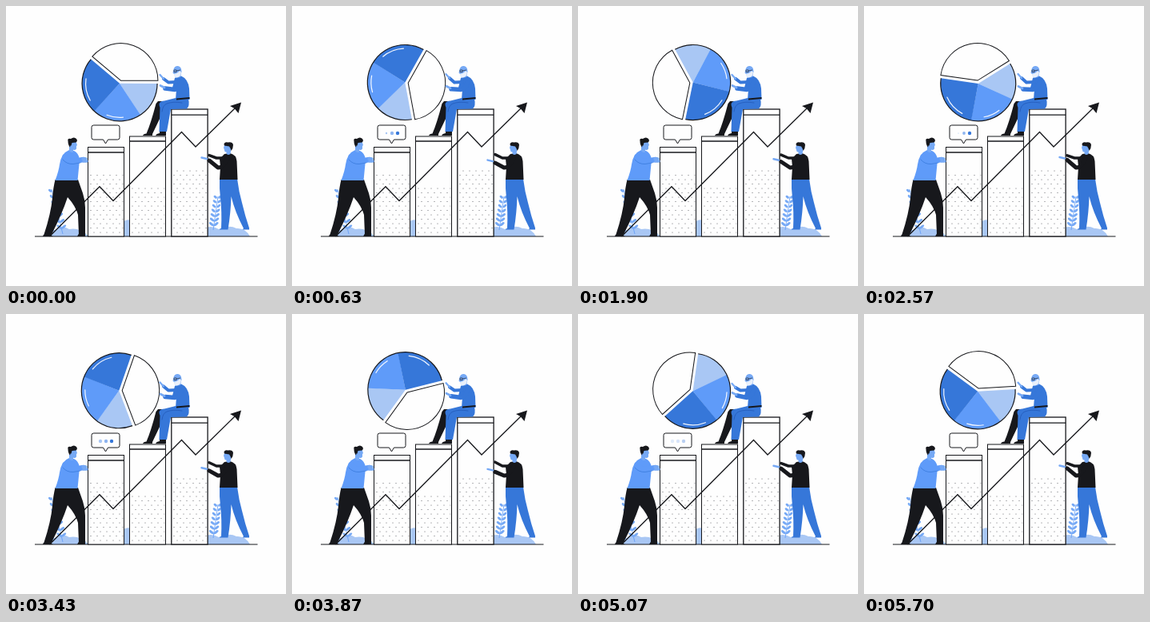
Write an HTML page that moves like this. It is 350x350 px and loops after 5730 ms.

```html
<!DOCTYPE html>
<html lang="en">
<head>
<meta charset="utf-8">
<title>Growth chart</title>
<style>
  html, body { margin: 0; width: 100%; height: 100%; overflow: hidden; background: #fefefe; }
  svg { display: block; width: 100vw; height: 100vh; }
  .ink { fill: #17181c; }
  .deep { fill: #3677d9; }
  .mid { fill: #5f9bf9; }
  .skin { fill: #76a9f5; }
  .pale { fill: #a9c7f4; }
  .line { fill: none; stroke: #17181c; stroke-width: 1; stroke-linejoin: miter; }
  .paper { fill: #fefefe; stroke: #17181c; stroke-width: 1; }
  .limb { fill: none; stroke-linecap: round; stroke-linejoin: round; }
</style>
</head>
<body>
<svg viewBox="0 0 350 350">
  <defs>
    <pattern id="specks" width="8" height="11" patternUnits="userSpaceOnUse">
      <circle cx="2" cy="2.5" r=".55" fill="#55575e"/>
      <circle cx="6" cy="8" r=".55" fill="#55575e"/>
    </pattern>
  </defs>

  <!-- ground and plants -->
  <g class="pale">
    <path d="M46 288Q51 278 61 280Q70 273 79 279Q91 276 104 288Z"/>
    <path d="M146 288V270Q151 266 156 268V288Z"/>
    <path d="M250 288V277Q258 274 266 279Q279 273 288 278Q299 277 305 288Z"/>
  </g>
  <g id="plants"></g>
  <path class="line" d="M36 288H314.500"/>

  <g id="bars"></g>

  <!-- speech bubble -->
  <path class="paper" d="M109.500 149H139.500Q142 149 142 151.500V164.500Q142 167 139.500 167H127.500L124.500 172L121.500 167H109.500Q107 167 107 164.500V151.500Q107 149 109.500 149Z"/>
  <g id="typing"></g>

  <!-- man on the left -->
  <g>
    <path class="ink" d="M61.500 217H90L96 234Q99 243 99 252V285.500H91L90 261Q87 250 77 239Q70 260 57 285.500H47.500Q56 260 58 240Q59 227 61.500 217Z"/>
    <path class="ink" d="M46 288Q47 284.500 50 284.500H57Q56 287 59 288ZM89 288L91 284.500H99V288Z"/>
    <path class="mid" d="M79 180L85 181Q91 184 92 192L89.500 218H61.500Q66 206 67 198Q69 184 79 180Z"/>
    <path class="limb" stroke="#5f9bf9" stroke-width="6.500" d="M74 188Q77 194 84 194L97 192"/>
    <path class="limb" stroke="#3677d9" stroke-width=".7" d="M71 192Q76 198 84 197.500L93 196"/>
    <path class="limb" stroke="#76a9f5" stroke-width="3.500" d="M96 191L100 191M97 194L101 194"/>
    <path class="skin" d="M79 170L87.500 169.500L89 174L88 175V178.500Q86 181 84 179.500V182.500Q81 184 79 181Z"/>
    <path class="ink" d="M77.500 169Q76.500 165 81 166Q85 163 88 166Q90 168.500 87.500 170.500L82.500 171L81.500 174.500H80.500L80 176.500Q77.500 174 77.500 169Z"/>
  </g>

  <!-- seated man -->
  <g>
    <path class="ink" d="M187.500 122L190 119L196 119L193.500 138L183 160V162H171Q172 159.500 175.500 159.500Q181 147 187.500 122ZM192 156H200V162H187Q188 159.500 192 159Z"/>
    <path class="deep" d="M228 116Q230 125 226 128.500L206 129L201 157H191.500L192.500 127Q189 119 198 118.500L212 115Z"/>
    <path class="limb" stroke="#2157b5" stroke-width=".7" d="M220 121Q209 119 201 122Q196 124 195 132"/>
    <path class="deep" d="M211 90L219 87.500Q227.500 91 229 103L229.500 117H212L213 104L208 102Z"/>
    <path class="ink" d="M213 115.500L229.500 114V116L213 117.500Z"/>
    <path class="skin" d="M209.500 79Q211 74.500 215 75Q219.500 76 219.500 82L218 89L212 90L210 85L208.500 83.500Z"/>
    <path fill="#e9f0fb" d="M210 85L213.500 84L217.500 81L219 83Q218.500 89 213 89.500Q210 89 210 85Z"/>
    <path class="line" style="stroke-width:.6" d="M210 80H213V82.500H210ZM213 81L218 80"/>
  </g>

  <!-- man on the right -->
  <g>
    <path class="deep" d="M267 216H289Q291 232 295 246Q299 263 304 277.500V279.500H295.500L297 278Q286 257 281.500 238Q281 258 277.500 279.500H266.500Q267 278.500 269 278Q270 257 268 240Q266.500 228 267 216Z"/>
    <path class="ink" d="M273 185L280 184Q288 186 288.500 194L289.500 217H267L268 201L267 191Z"/>
    <path class="skin" d="M273.500 173L281 173V182L280.500 185Q277 187 275.500 184.500V182.500Q273 183 273 180L272 177Z"/>
    <path class="ink" d="M272.500 173Q273 169.500 277.500 170.500Q283 169.500 284 173.500Q284 178 281.500 181L280.500 178L279 175.500L273 174.500Z"/>
    <g id="reach"></g>
  </g>

  <!-- rising arrow -->
  <path class="line" style="stroke-width:1.3" d="M54.500 288L117 225.800L134 243.500L219.500 157.500L237 176L286 128"/>
  <path class="ink" d="M294 120.500L280 125L285.500 128L290.500 134Z"/>

  <g id="pie"></g>
  <g id="push"></g>
</svg>
<script>
const LOOP = 5730, TAU = Math.PI * 2;
const $ = id => document.getElementById(id);
const ramp = (v, a, b) => Math.min(1, Math.max(0, (v - a) / (b - a)));

function plant(x, y, height, lean) {
  let out = `<path d="M${x} ${y}q${-lean} ${-height / 2} ${-lean * 2} ${-height}" fill="none" stroke="#5f9bf9" stroke-width=".8"/>`;
  for (let i = 0; i < 7; i++) {
    const k = .12 + i * .135, px = x - lean * 2 * k, py = y - height * k;
    for (const angle of [218, -38]) {
      out += `<ellipse class="skin" cx="3.6" rx="${3.6 - i * .18}" ry="1.5" transform="translate(${px} ${py}) rotate(${angle})"/>`;
    }
  }
  return out;
}
$('plants').innerHTML = plant(71, 285, 56, 7) + plant(259, 280, 42, -3);

const bar = (x, top, width, cap, specks, weight = 1) => `
  <rect class="paper" style="stroke-width:${weight}" x="${x}" y="${top}" width="${width}" height="${288 - top}"/>
  <rect x="${x + 1}" y="${specks}" width="${width - 2}" height="${287 - specks}" fill="url(#specks)"/>
  <path class="line" style="stroke-width:1.3" d="M${x} ${top + cap}h${width}"/>`;
$('bars').innerHTML = bar(102.5, 176.5, 45, 6.5, 207) + bar(154.5, 163, 45, 6, 225) + bar(206.8, 129, 45.3, 7.2, 204, 1.3);

// Pie, drawn around its own centre at the starting angle
const polar = (r, deg) => [r * Math.cos(deg * TAU / 360), r * Math.sin(deg * TAU / 360)].map(v => v.toFixed(2)).join(' ');
const arc = (r, a, b) => `${polar(r, a)}A${r} ${r} 0 ${b - a > 180 ? 1 : 0} 1 ${polar(r, b)}`;
const sector = (r, a, b) => `M0 0L${arc(r, a, b)}Z`;
const shine = (a, b) => `<path d="M${arc(42.5, a, b)}" fill="none" stroke="#f4f8ff" stroke-width="1.2" stroke-linecap="round"/>`;
$('pie').innerHTML = `
  <g transform="translate(${polar(1.2, 110)})">
    <path class="pale" d="${sector(47, 0, 57)}"/>
    <path class="mid" d="${sector(47, 56.5, 133)}"/>
    <path class="deep" d="${sector(47, 132.5, 220)}"/>
    <path class="line" style="stroke-width:1.2" d="M${arc(47, 0, 220)}"/>
    ${shine(84, 112)}${shine(150, 188)}
  </g>
  <path class="paper" transform="translate(${polar(2.7, 290)})" d="${sector(46.5, 220, 360)}"/>`;

$('typing').innerHTML = ['#a9c7f4', '#8db4f0', '#3677d9']
  .map((c, i) => `<circle cx="${118 + i * 7}" cy="159" fill="${c}"/>`).join('');
const dots = [...$('typing').children];

const turnKeys = [[0, 0], [1270, 160], [2570, 328], [3430, 429], [4330, 545], [5070, 638], [LOOP, 720]];
function turnAt(t) {
  const i = turnKeys.findIndex(k => k[0] > t);
  const [t0, a0] = turnKeys[i - 1], [t1, a1] = turnKeys[i];
  return a0 + (a1 - a0) * (t - t0) / (t1 - t0);
}

const limb = (d, color, width) => `<path class="limb" d="${d}" stroke="${color}" stroke-width="${width}"/>`;

function draw(t) {
  $('pie').setAttribute('transform', `translate(142.5 95.7) rotate(${turnAt(t)})`);

  // Dots fade in together, then shrink away from left to right
  const p = t % 955;
  dots.forEach((dot, i) => {
    const from = 580 + i * 55;
    dot.setAttribute('r', 2.2 * (1 - ramp(p, from, from + 110 + i * 70)));
    dot.setAttribute('opacity', ramp(p, 210, 460));
  });

  const lift = 2.5 * Math.cos(TAU * (t + 300) / (LOOP / 2));
  $('reach').innerHTML =
    limb(`M251 ${193 - lift}L244.5 ${191.5 - lift}`, '#76a9f5', 2.5) +
    limb(`M272 190L263 190L254 ${186 + lift / 3}`, '#17181c', 3.5) +
    limb(`M277 191Q271 203 265 202L254 ${195 - lift}`, '#17181c', 5);

  const nudge = Math.sin(TAU * t / (LOOP / 6));
  $('push').innerHTML =
    limb(`M213 95L203 95.5L197 ${91 + nudge}`, '#3677d9', 4) +
    limb(`M197 ${91 + nudge}L192.5 ${86 + nudge}`, '#76a9f5', 2.3) +
    limb(`M219 96Q217 104 211 104.5L199 ${103 - nudge}`, '#3677d9', 5.5) +
    limb(`M198 ${102 - nudge}L193 ${99.5 - nudge}`, '#76a9f5', 2.8);
}

const start = performance.now();
function tick() {
  draw((performance.now() - start) % LOOP);
  requestAnimationFrame(tick);
}
tick();
</script>
</body>
</html>
```
